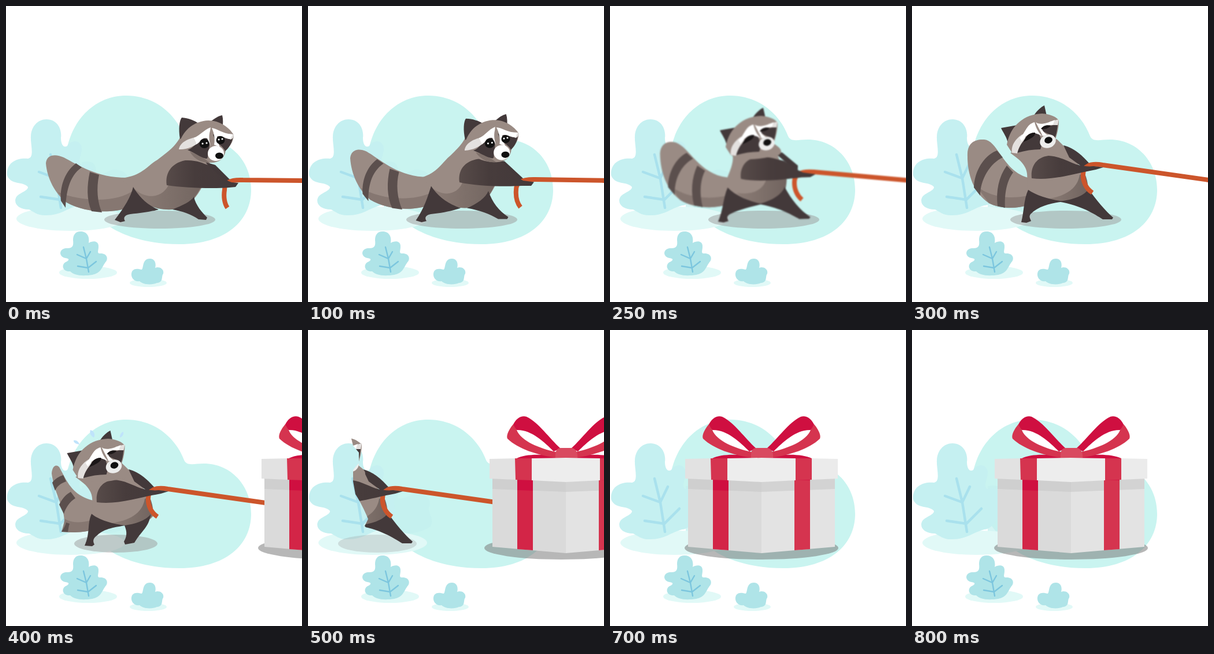
Recreate the animation shown at these times as an HTML page. Size 512 by 512 pixels, loop 1.8 s.

```html
<!DOCTYPE html>
<html lang="en">
<head>
<meta charset="utf-8">
<title>Raccoon pulling a gift</title>
<style>
html, body { margin: 0; width: 100%; height: 100%; overflow: hidden; background: #fff; }
svg { display: block; width: 100vw; height: 100vh; }
.dark { fill: #43393a; }
.fur { fill: #9a8b84; }
.shade { fill: #7f716b; }
.stripe { fill: #5b4f4d; }
.white { fill: #fff; }
.crimson { fill: #cf0f40; }
.red { fill: #d5344f; }
.small { fill: #afe4e8; }
.ground { fill: #e1f9f7; }
.line { fill: none; stroke-linecap: round; }
</style>
</head>
<body>
<svg viewBox="0 0 512 512">
  <defs>
    <linearGradient id="sleeve">
      <stop stop-color="#574b49"/><stop offset=".4" stop-color="#473c3c"/><stop offset="1" stop-color="#43393a"/>
    </linearGradient>
    <linearGradient id="belly">
      <stop stop-color="#8b7c75"/><stop offset="1" stop-color="#71645f"/>
    </linearGradient>
    <clipPath id="behindLeaf">
      <path d="M74 184L91 196H400V400H150L98 339L104 327C98 312 90 296 82 284L78 262V242L88 230V212L78 200Z"/>
    </clipPath>
  </defs>

  <!-- scenery -->
  <path fill="#c9f4f0" d="M105 250C115 195 155 155 208 155C260 155 295 190 308 225C313 236 325 231 342 231C390 231 424 270 424 318C424 372 380 412 300 412C240 412 195 395 170 375C150 355 105 310 105 250Z"/>
  <path fill="#c4f1ef" opacity=".7" d="M131 270C150 265 158 275 155 290C165 295 175 285 185 283C200 282 215 290 210 305C205 315 220 325 212 340C195 352 160 357 131 348Z"/>
  <ellipse class="ground" cx="112" cy="368" rx="94" ry="21"/>
  <path fill="#c5f0f1" d="M70 196C90 196 97 215 95 228C95 240 100 246 106 242C112 232 128 230 131 245C132 258 122 268 130 275C148 270 156 282 148 298C156 320 140 345 125 345C105 350 95 362 70 362C55 363 48 356 40 352C20 352 12 340 18 330C25 322 38 320 38 313C30 303 8 310 2 293C0 270 20 262 38 264C50 262 42 240 43 225C44 208 55 196 70 196Z"/>
  <path class="line" stroke="#a9e1ed" stroke-width="4.5" d="M77 257L87 298L95 349M57 287L87 298L100 271M60 330L94 335L120 309"/>
  <ellipse class="ground" cx="142" cy="461" rx="50" ry="11"/>
  <path class="small" transform="translate(-1 0)" d="M130 390C142 390 146 400 144 410C150 406 162 405 161 417C161 422 158 428 163 428C176 427 178 437 174 442C166 452 166 462 150 465C130 468 118 465 112 459C99 460 96 448 104 443C111 440 111 437 104 436C92 434 92 420 105 419C117 420 118 414 117 405C117 396 121 390 130 390Z"/>
  <path class="line" stroke="#7cc6de" stroke-width="2.4" d="M134 417L139 437L143 460M123 430L139 437L146 425M124 450L142 453L156 442"/>
  <ellipse class="ground" cx="246" cy="479" rx="32" ry="7"/>
  <path class="small" transform="translate(-1 0)" d="M250 437C259 437 261 446 259 453C266 450 275 455 273 463C269 468 274 478 262 479C252 483 238 482 232 476C222 478 215 468 219 459C223 453 231 455 235 456C240 456 235 437 250 437Z"/>

  <!-- raccoon -->
  <g id="raccoon">
    <ellipse id="shadow" cy="369.5" ry="15.5" fill="rgb(155,155,155)"/>
    <g id="mask"><g id="figure">
      <path id="tail" class="fur"/>
      <path id="tailShade" class="shade" opacity=".75"/>
      <path id="ring1" class="stripe"/>
      <path id="ring2" class="stripe"/>
      <path id="body" class="fur"/>
      <path id="bellyShade" fill="url(#belly)"/>
      <path id="legL" class="dark"/>
      <path id="legR" class="dark"/>
      <path id="farArm" class="dark"/>
      <path id="rope" class="line" stroke="#cc552b" stroke-width="8" style="stroke-linecap:butt"/>
      <path id="arm" fill="url(#sleeve)"/>
      <g id="awake">
        <path class="dark" d="M301 230C298 212 300 198 304 193C316 194 326 198 333 203L312 226ZM354 200C361 194 368 190 374 189C376 196 375 203 375 210Z"/>
        <path class="fur" d="M300 236C308 213 326 199 350 198C370 198 386 210 394 223C394 232 388 243 380 250C378 263 370 271 355 271C335 272 314 262 300 246Z"/>
        <path class="shade" d="M318 252C330 256 342 262 352 271C336 271 325 264 318 252Z"/>
        <path class="dark" d="M314 249C326 246 332 230 346 225C355 232 352 244 350 252C348 262 350 264 346 264C336 262 325 253 314 249ZM358 222L392 228C391 238 384 247 379 251C374 240 364 240 358 222Z"/>
        <path fill="#e4e1df" d="M299 248C301 236 314 229 334 226L338 233C326 243 312 249 299 248ZM374 220L394 222C394 227 392 230 388 231Z"/>
        <path class="white" d="M325 228C336 224 342 214 354 210L353 216C350 226 352 236 354 242L348 229C340 226 334 235 330 239ZM356 211C366 212 374 221 392 222L388 230C378 230 372 222 365 226C366 234 368 240 370 244L360 240C362 230 360 220 356 211Z"/>
        <ellipse class="white" cx="363" cy="255" rx="14" ry="13"/>
        <ellipse cx="369" cy="259" rx="7" ry="5.5" fill="#111"/>
        <ellipse cx="343" cy="238" rx="8.5" ry="8" fill="#111"/>
        <ellipse cx="371" cy="232" rx="7.5" ry="7" fill="#111"/>
        <path class="line" stroke="#fff" stroke-width="3" d="M340 238h.1M347 237h.1M368 231h.1M374 230h.1"/>
      </g>
      <g id="strain">
        <path class="dark" d="M154 211L188 205L166 238C164 226 158 220 154 211ZM211 189C217 180 224 174 229 172L233 190Z"/>
        <path class="fur" d="M164 240C170 206 195 187 225 186C240 187 250 192 254 198C254 212 250 225 247 234C268 246 262 256 240 257C215 262 192 264 173 254Z"/>
        <path class="dark" d="M182 254C187 236 202 220 217 218C224 226 226 240 222 248C208 248 196 250 182 254ZM222 212L252 204C251 214 250 222 247 228C240 220 230 222 222 212Z"/>
        <path fill="#e4e1df" d="M173 254C171 240 180 229 191 222L197 228C188 238 184 246 182 255ZM238 200L254 196L252 206L238 206Z"/>
        <path class="white" d="M186 228C198 218 197 205 212 201C214 210 218 218 225 225L219 222C206 216 196 224 190 234ZM214 201C220 206 232 204 247 197L244 205C234 206 228 208 224 211C226 217 230 220 234 223L226 225C222 216 218 209 214 201Z"/>
        <ellipse fill="#ededec" cx="235" cy="234" rx="14" ry="11.5" transform="rotate(-20 235 234)"/>
        <ellipse cx="236" cy="232" rx="7" ry="5.5" fill="#111" transform="rotate(-20 236 232)"/>
        <path fill="#1b1617" d="M193 235C196 225 204 218 213 219C214 226 204 230 193 235ZM223 213C226 207 233 205 240 207C236 212 230 213 223 213Z"/>
      </g>
    </g></g>
    <path id="sweat" fill="#bfe3fb" d="M117 191C122 190 126 194 127 198C121 197 117 195 117 191ZM146 173C152 174 155 181 152 186C147 184 144 178 146 173ZM203 176C204 181 201 185 197 186C197 181 199 177 203 176Z"/>
  </g>

  <!-- gift -->
  <g id="gift">
    <ellipse id="giftShadow" cx="275" cy="377" rx="133" ry="20" fill="rgb(125,125,125)"/>
    <path fill="#dadada" d="M148 256H275V386L148 375Z"/>
    <path fill="#e3e3e3" d="M275 256H402V375L275 386Z"/>
    <path fill="#cfcfcf" d="M148 256H275V280L148 275Z"/>
    <path fill="#d3d3d3" d="M275 256H402V275L275 280Z"/>
    <path fill="#d32547" d="M191 256H218V381L191 379Z"/>
    <path class="red" d="M332 256H359V379L332 381Z"/>
    <path class="crimson" d="M191 256H218V278L191 277ZM332 258H359V260H332Z"/>
    <path class="crimson" d="M190 222C205 214 235 214 275 220C315 214 345 214 362 222Z"/>
    <path fill="#e2e2e2" d="M143 223L188 222V259L143 257Z"/>
    <path fill="#ededed" d="M216 222L275 221V263L216 260Z"/>
    <path fill="#ededed" d="M275 221L334 222V260L275 263Z"/>
    <path fill="#ebebeb" d="M362 222L407 223V257L362 259Z"/>
    <path class="red" d="M187 222H216V260L188 259ZM334 222H362V259L334 260Z"/>
    <g id="loop">
      <path class="white" d="M190 173C215 170 238 190 254 208V214C225 205 195 190 190 173Z"/>
      <path class="crimson" d="M183 166C188 152 199 147 207 150C228 160 246 187 266 205L254 210C238 194 215 172 190 173Z"/>
      <path class="red" d="M184 163C174 175 172 184 174 188C193 206 225 216 258 221V211C230 205 197 192 190 173C188 170 186 167 184 163Z"/>
    </g>
    <use href="#loop" transform="matrix(-1 0 0 1 550 0)"/>
    <path fill="#d94a60" d="M257 221C256 210 259 204 267 204H284C292 204 296 212 295 221Z"/>
  </g>
</svg>

<script>
// Each part lists its outline in four key poses: reach, lean, strain, step.
// A missing fourth outline repeats the strained one.
const parts = {
  tail: ["M69 272C70 257 85 255 100 262C125 275 160 299 215 297L240 335C210 358 150 364 105 340C85 325 71 298 69 272",
    "M77 255C78 240 90 235 102 241C125 255 150 292 200 295L206 342C180 352 135 348 110 330C90 312 79 285 77 255",
    "M96 255C97 237 108 230 125 231C150 233 158 290 206 298L201 344C180 352 150 350 133 341C106 323 95 290 96 255",
    "M129 248C130 236 136 231 142 237C156 262 164 288 206 296L198 346C185 350 165 351 146 349C162 320 134 290 129 248"],
  tailShade: ["M90 322C130 338 190 342 222 318L240 335C210 358 150 364 105 340Z",
    "M92 307C115 328 160 338 205 328L206 342C180 352 135 348 110 330Z",
    "M106 304C120 325 160 337 200 328L201 344C180 352 150 350 133 341Z",
    "M152 327C165 334 180 334 198 329L198 346C185 350 165 351 146 349Z"],
  ring1: ["M121 272L131 279C108 295 104 325 103 349L95 337C93 315 100 288 121 272",
    "M118 258L130 266C110 280 104 300 106 326L94 313C93 290 102 270 118 258",
    "M147 250L157 262C135 272 118 300 118 328L107 314C108 285 125 258 147 250",
    "M149 251L154 262C145 265 138 270 135 278L130 264C134 258 142 253 149 251"],
  ring2: ["M145 287L161 292C156 315 158 340 166 357L148 355C139 335 140 310 145 287",
    "M138 276L154 282C148 300 150 325 160 347L143 344C134 325 132 300 138 276",
    "M164 276L175 288C162 305 160 330 161 349L148 346C145 320 150 295 164 276",
    "M162 280L170 291C160 297 153 308 150 318L142 302C147 292 154 284 162 280M154 333L160 335C158 340 158 345 157 349L146 349C150 343 153 338 154 333"],
  body: ["M195 298C235 296 245 275 262 266C280 252 292 244 302 226L352 262C356 285 335 335 305 350C270 356 240 345 220 316Z",
    "M195 296C213 283 222 262 230 252C236 242 240 236 243 228L318 262C318 290 305 335 270 348C240 345 215 330 206 312Z",
    "M200 322C198 300 202 290 195 278C190 268 180 262 170 254L250 230C285 262 300 290 306 318C300 342 225 342 200 322Z"],
  bellyShade: ["M222 316C245 338 275 330 283 305L345 295C330 335 310 360 262 350C240 345 228 330 222 316",
    "M206 312C225 325 245 322 252 303L312 290C304 330 290 345 264 348C240 343 216 328 206 312",
    "M232 334C262 330 286 318 290 292L299 290C310 318 306 335 262 338C250 338 240 337 232 334"],
  legL: ["M220 313C216 330 205 348 188 370L198 374L206 372C202 366 206 361 215 360C235 358 255 355 264 352C245 345 230 330 220 313",
    "M206 310C198 330 198 350 185 372L195 374L204 372C200 366 202 362 210 360C230 358 250 352 264 347C240 340 218 328 206 310",
    "M201 318C193 335 194 355 189 374L198 375L206 372C204 366 202 365 205 360C220 345 240 342 262 338C240 335 215 328 201 318",
    "M198 318C190 335 196 352 186 373L199 374L203 371C200 366 200 360 208 355C220 343 240 341 257 338C235 336 210 328 198 318"],
  legR: ["M288 352C305 345 320 338 325 330C328 345 340 358 348 366L346 370L333 369C320 360 305 355 288 352",
    "M262 347C280 340 295 325 299 310C310 335 320 350 345 364L343 367L325 368C310 360 290 352 262 347",
    "M250 338C275 337 300 328 305 316C318 335 335 355 348 366L346 369L330 369C315 360 292 344 250 338",
    "M255 338C280 335 295 326 300 319C298 340 284 348 272 368L256 371L254 366C261 354 258 346 255 338"],
  farArm: ["M345 270L362 275L390 303L372 304Z", "M304 264L318 262L358 297L340 300Z", "M262 241C278 245 292 255 309 275L298 281L272 262Z"],
  arm: ["M278 310C275 290 285 272 310 267C330 266 340 272 350 275C362 288 378 301 390 305L402 306L397 313L386 314C360 316 310 315 278 310",
    "M246 300C243 280 255 264 280 262C300 262 310 262 318 262C330 275 342 290 354 299L380 303L375 309L354 308C320 310 270 308 246 300",
    "M207 298C205 280 213 262 236 259C255 260 268 268 284 274C296 277 305 278 314 277L331 279L318 283L308 285C280 290 240 303 207 298"],
  rope: ["M520 302L410 301C386 300 378 306 378 318C376 330 378 342 383 349",
    "M520 302L375 299C350 299 342 306 342 318C342 330 346 340 352 347",
    "M520 302L330 275C308 271 296 277 296 291C295 303 301 316 312 323"]
};

const steps = [
  { t: 0, pose: 0 },
  { t: 100, pose: .5, head: "translate(-29 -.5) rotate(-3 345 232)" },
  { t: 200, pose: 1, head: "translate(-58 -1) rotate(-6 345 232)", blur: .8 },
  { t: 250, pose: 1.5, head: "translate(36 4)", blur: .8 },
  { t: 300, pose: 2 },
  { t: 400, pose: 3, x: -50, head: "translate(1.5 2)", shadow: [190, 72], gift: 299, lag: 5 },
  { t: 500, pose: 2, x: -167, head: "translate(6 0)", shadow: [120, 68], fade: .3, blur: .7, hidden: true, gift: 171, lag: 8 },
  { t: 600, gift: 0, soft: true },
  { t: 700, gift: -13 },
  { t: 800, gift: 0 }
];

const $ = id => document.getElementById(id);
const set = (id, attrs) => { for (const k in attrs) $(id).setAttribute(k, attrs[k]); };
const show = (id, on) => { $(id).style.display = on ? "" : "none"; };

function blend(a, b, k) {
  const to = b.match(/[\d.]+/g);
  let i = 0;
  return a.replace(/[\d.]+/g, n => +n + (to[i++] - n) * k);
}

function drawRaccoon({ pose, x = 0, head = "", shadow = [266, 96], fade = .5, blur = 0, hidden }) {
  const from = Math.floor(pose), mix = pose - from;
  for (const id in parts) {
    const list = parts[id], a = list[from] || list[2];
    set(id, { d: mix ? blend(a, list[from + 1], mix) : a });
  }
  const awake = pose < 1.5;
  show("awake", awake);
  show("strain", !awake);
  set(awake ? "awake" : "strain", { transform: head });
  show("sweat", pose === 3);
  set("figure", { transform: `translate(${x} 0)` });
  $("figure").style.filter = blur ? `blur(${blur}px)` : "none";
  set("mask", { "clip-path": hidden ? "url(#behindLeaf)" : "none" });
  set("shadow", { cx: shadow[0], rx: shadow[1], opacity: fade });
}

function drawGift({ gift, soft, lag = 0 }) {
  set("gift", { transform: `translate(${gift} 0)` });
  set("giftShadow", { cx: soft ? 255 : 275 - lag, rx: soft ? 150 : 133, ry: soft ? 14 : 20, opacity: soft ? .22 : .55 });
  $("giftShadow").style.filter = soft ? "blur(7px)" : "none";
}

let current;
function frame() {
  const t = performance.now() % 1800;
  const step = steps.filter(s => s.t <= t).pop();
  if (step !== current) {
    current = step;
    const pulling = "pose" in step, boxed = "gift" in step;
    show("raccoon", pulling);
    show("gift", boxed);
    if (pulling) drawRaccoon(step);
    if (boxed) drawGift(step);
  }
  requestAnimationFrame(frame);
}
frame();
</script>
</body>
</html>
```
